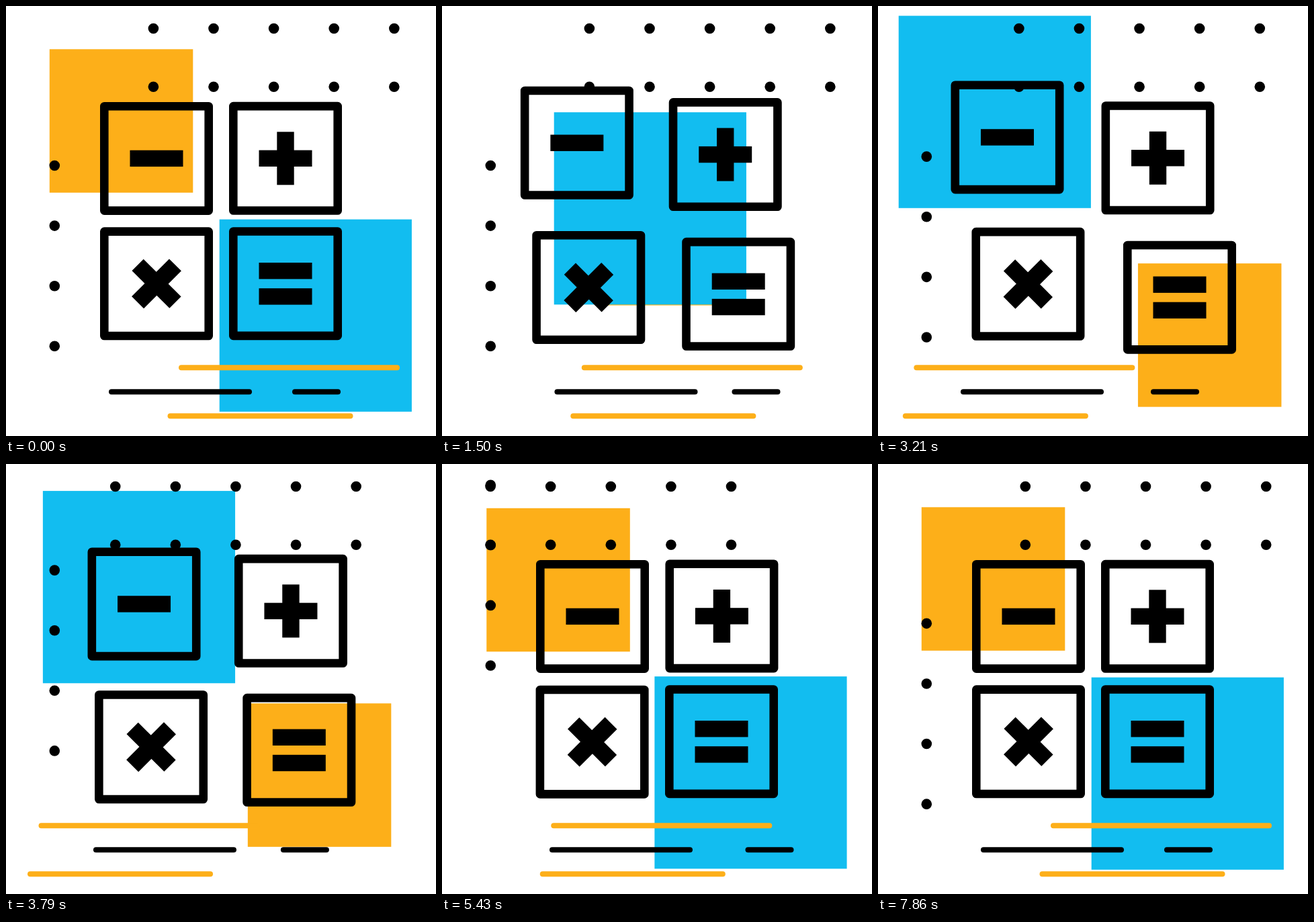
Write an HTML page with a canvas that moves like this. It is 640 by 640 pixels and loops after 7.93 s.

```html
<!DOCTYPE html>
<html>
<head>
<meta charset="utf-8">
<title>Calculator keys</title>
<style>
html, body { margin: 0; width: 100%; height: 100%; overflow: hidden; background: #fff; }
canvas { display: block; width: 100vmin; height: 100vmin; }
</style>
</head>
<body>
<canvas width="640" height="640"></canvas>
<script>
const ctx = document.querySelector('canvas').getContext('2d');
const LOOP = 7930;
const ORANGE = '#fdaf19', BLUE = '#12bdf0', BLACK = '#000';

// Cubic timing curve from (0,0) to (1,1) with flat ends
function ease(x, x1, x2) {
  let lo = 0, hi = 1;
  for (let i = 0; i < 24; i++) {
    const s = (lo + hi) / 2, r = 1 - s;
    if (3 * x1 * s * r * r + 3 * x2 * s * s * r + s * s * s < x) lo = s; else hi = s;
  }
  return lo * lo * (3 - 2 * lo);
}

// Eased 0..1 progress between two times
function ramp(t, from, to, x1 = 0.7, x2 = 1 - x1) {
  return ease(Math.min(1, Math.max(0, (t - from) / (to - from))), x1, x2);
}

// Alternates 0, 1, 0, 1, ... at the given times
function swing(t, ...keys) {
  let v = 0;
  for (let i = 1; i < keys.length; i++) {
    v += (i % 2 ? 1 : -1) * ramp(t, keys[i - 1], keys[i], 0.74);
  }
  return v;
}

// Smooth curve through [time, value] points, level at every peak
function curve(t, points) {
  const n = points.length - 1;
  if (t >= points[n][0]) return points[n][1];
  const rise = i => (points[i + 1][1] - points[i][1]) / (points[i + 1][0] - points[i][0]);
  const slope = i => {
    if (i === 0 || i === n) return 0;
    const a = rise(i - 1), b = rise(i);
    return a * b > 0 ? 2 * a * b / (a + b) : 0;
  };
  const i = points.findIndex((p, k) => t < points[k + 1][0]);
  const h = points[i + 1][0] - points[i][0], u = (t - points[i][0]) / h, w = 1 - u;
  return points[i][1] * w * w * (1 + 2 * u) + points[i + 1][1] * u * u * (3 - 2 * u)
    + h * u * w * (w * slope(i) - u * slope(i + 1));
}

function rect(color, x, y, w, h) {
  ctx.fillStyle = color;
  ctx.fillRect(x, y, w, h);
}

function dot(x, y) {
  ctx.fillStyle = BLACK;
  ctx.beginPath();
  ctx.arc(x, y, 7.8, 0, 7);
  ctx.fill();
}

function line(color, x, y, length) {
  ctx.strokeStyle = color;
  ctx.lineWidth = 8;
  ctx.beginPath();
  ctx.moveTo(x + 4, y);
  ctx.lineTo(x + length - 4, y);
  ctx.stroke();
}

const bar = (y = 0) => rect(BLACK, -39.5, y - 12.2, 79, 24.4);
const cross = () => { bar(); rect(BLACK, -12.7, -39.5, 25.4, 79); };

const symbols = {
  minus: () => bar(),
  plus: cross,
  times: () => { ctx.rotate(Math.PI / 4); cross(); },
  equals: () => { bar(-19); bar(19.2); }
};

function key(name, x, y) {
  ctx.save();
  ctx.translate(x, y);
  ctx.strokeStyle = BLACK;
  ctx.lineWidth = 12.6;
  ctx.strokeRect(-77.7, -77.7, 155.4, 155.4);
  symbols[name]();
  ctx.restore();
}

const longLine = [[0, 153], [1200, 171], [1500, 167.5], [2400, 107], [2500, 107.5],
  [3210, 123], [4290, 136], [5430, 160], [7700, 153]];
const shortLine = [[0, 426], [1200, 433], [1500, 431.5], [2500, 398],
  [3210, 406], [4290, 412], [5430, 451.5], [7700, 426]];

function draw(t) {
  rect('#fff', 0, 0, 640, 640);

  const swap = ramp(t, 0, 2990, 0.59, 0.39) - ramp(t, 2990, 5660, 0.75, 0.23);
  rect(ORANGE, 64.8 + 323.6 * swap, 64.3 + 320.3 * swap, 213.5, 213.5);
  rect(BLUE, 317.7 - 288.3 * swap, 317.6 - 304.4 * swap, 286.2, 286.2);

  const scroll = ramp(t, 2625, 5200, 0.6) - ramp(t, 5800, LOOP);
  for (let i = 0; i < 5; i++) {
    const x = 219.4 + 89.6 * i - 147.3 * scroll;
    dot(x, 33.5);
    dot(x, 120.2);
    if (i < 4) dot(72.3, 237.5 + 89.6 * i - 206.3 * scroll);
  }

  ctx.lineCap = ctx.lineJoin = 'round';
  const slide = 208.5 * (ramp(t, 0, 3850, 0.67, 0.3) - ramp(t, 3850, 6900, 0.6));
  line(ORANGE, 257 - slide, 538.2, 329);
  line(ORANGE, 240.5 - slide, 610.3, 276);
  line(BLACK, curve(t, longLine), 574.3, 213);
  line(BLACK, curve(t, shortLine), 574.3, 72);

  const minus = 31.5 * swing(t, 0, 1130, 2000, 3190, 4450);
  const equals = swing(t, 0, 1150, 2000, 3210, 4450);
  const side = 31.5 * swing(t, 1100, 2150, 3400, 4330, 5600);
  key('minus', 224 - minus, 226.9 - minus);
  key('plus', 416 + side, 226.8 - side);
  key('times', 224 - side, 413.3 + side);
  key('equals', 416 + 33 * equals, 413.2 + 20.5 * equals);
}

function tick() {
  draw(performance.now() % LOOP);
  requestAnimationFrame(tick);
}
tick();
</script>
</body>
</html>
```
